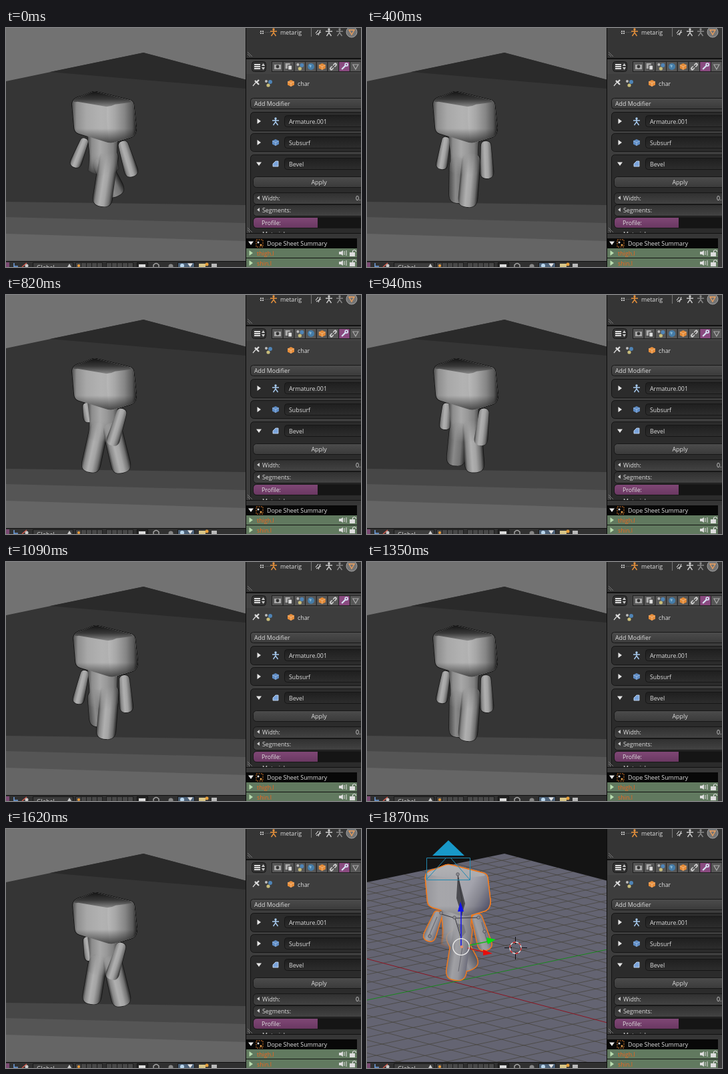
Write an HTML page that moves like this. It is 532 px wide and 359 px high and loops after 2870 ms.

```html
<!DOCTYPE html>
<html lang="en">
<head>
<meta charset="utf-8">
<title>Walk cycle</title>
<style>
html, body { margin: 0; width: 100%; height: 100%; overflow: hidden; background: #333; }
svg { display: block; width: 532px; height: 359px; }
text { font: 8.9px "Open Sans", "Noto Sans", sans-serif; fill: #dedede; }
</style>
</head>
<body>
<svg id="stage" viewBox="0 0 532 359" xmlns="http://www.w3.org/2000/svg"></svg>
<script>
const LOOP = 2870;

// Small SVG helpers
const path = (d, fill, extra = '') => `<path d="${d}" fill="${fill}" ${extra}/>`;
const line = (d, color, width = 1, extra = '') =>
  `<path d="${d}" fill="none" stroke="${color}" stroke-width="${width}" ${extra}/>`;
const rect = (x, y, w, h, fill, extra = '') =>
  `<rect x="${x}" y="${y}" width="${w}" height="${h}" fill="${fill}" ${extra}/>`;
const dot = (x, y, r, fill, extra = '') => `<circle cx="${x}" cy="${y}" r="${r}" fill="${fill}" ${extra}/>`;
const text = (x, y, s, extra = '') => `<text x="${x}" y="${y}" ${extra}>${s}</text>`;
const gradient = (id, dir, colors) =>
  `<linearGradient id="${id}" x1="${dir[0]}" y1="${dir[1]}" x2="${dir[2]}" y2="${dir[3]}">` +
  colors.split(' ').map(s => {
    const [color, at] = s.split('@');
    return `<stop offset="${at}%" stop-color="${color}"/>`;
  }).join('') + '</linearGradient>';

const ACROSS = [0, 0, 1, 0], DOWN = [0, 0, 0, 1];
const FLOOR = 'M0 80L206 37L359 77.500V350H0Z';
const defs = `<defs>
${gradient('lit-limb', ACROSS, '#383838@0 #858585@13 #b0b0b0@38 #a4a4a4@60 #707070@84 #262626@100')}
${gradient('lit-far', ACROSS, '#4a4a4a@0 #8a8a8a@35 #737373@70 #222@100')}
${gradient('lit-body', ACROSS, '#4a4a4a@0 #8c8c8c@14 #a8a8a8@40 #989898@62 #808080@82 #404040@100')}
${gradient('lit-front', ACROSS, '#4c4c4c@0 #8f8f8f@7 #a8a8a8@22 #b2b2b2@45 #a8a8a8@100')}
${gradient('lit-side', ACROSS, '#b8b8b8@0 #a6a6a6@28 #868686@60 #5a5a5a@86 #1e1e1e@100')}
${gradient('lit-top', DOWN, '#161616@0 #383838@50 #858585@100')}
${gradient('lit-shade', DOWN, '#0000@0 #0000@72 #0009@100')}
${gradient('clay-limb', ACROSS, '#77777e@0 #a0a0a4@30 #98989d@60 #6d6d7b@100')}
${gradient('clay-far', ACROSS, '#77777e@0 #93939a@40 #55555f@100')}
${gradient('clay-body', ACROSS, '#85858a@0 #a5a5a9@35 #9b9ba0@65 #77777f@100')}
${gradient('clay-front', ACROSS, '#96969b@0 #a6a6aa@20 #a3a3a8@100')}
${gradient('clay-side', [0, 0, 1, 0.8], '#a9a9b0@0 #a3a3ac@35 #85858f@65 #505068@100')}
${gradient('clay-top', DOWN, '#b2b2b5@0 #a8a8ac@100')}
${gradient('clay-shade', DOWN, '#0000@0 #0000@80 #0003@100')}
${gradient('fade-down', DOWN, '#fff@0 #fff@50 #000@95')}
${gradient('button', DOWN, '#4c4c4c@0 #3a3a3a@100')}
${gradient('field', DOWN, '#303030@0 #434343@100')}
${gradient('entry', DOWN, '#1f1f1f@0 #2d2d2d@100')}
${gradient('slider', DOWN, '#7f4775@0 #6a3862@100')}
<mask id="fade" maskUnits="userSpaceOnUse" x="100" y="150" width="100" height="75">
${rect(100, 150, 100, 75, 'url(#fade-down)')}</mask>
<clipPath id="view"><rect width="359" height="350"/></clipPath>
<clipPath id="floor"><path d="${FLOOR}"/></clipPath>
<clipPath id="panel"><rect x="360" y="0" width="172" height="308"/></clipPath>
</defs>`;

// Poses: head shift, then start and tip of far arm, near arm, far leg, near leg
const contact = [0, 119, 166, 102, 209, 174, 170, 190, 223, 139, 195, 168, 252, 156, 182, 143, 268];
const passing = [0, 119, 164, 111, 212, 178, 170, 180, 226, 137, 195, 137, 263, 157, 188, 150, 269];
const reach = [1, 121, 162, 127, 198, 174, 171, 157, 226, 139, 190, 127, 263, 157, 190, 175, 266];
const stride = [0, 120, 162, 126, 191, 175, 171, 158, 226, 141, 192, 125, 266, 157, 192, 175, 267];
const back = [2, 119, 163, 107, 213, 177, 170, 181, 226, 135, 192, 140, 247, 156, 184, 149, 266];
const mix = (a, b) => a.map((v, i) => (v + b[i]) / 2);
const closing = mix(passing, reach), opening = mix(stride, back);

// A tapered limb with rounded ends, built upright and then turned
function limb([x1, y1, x2, y2], top, tip, fill) {
  const len = Math.hypot(x2 - x1, y2 - y1);
  const turn = Math.atan2(y2 - y1, x2 - x1) * 180 / Math.PI - 90;
  const a = top / 2, b = tip / 2, end = len - b;
  const d = `M${-a} ${a}Q${-a} 0 0 0Q${a} 0 ${a} ${a}L${b} ${end}` +
    `C${b} ${len - 3} ${b * 0.65} ${len} 0 ${len}C${-b * 0.65} ${len} ${-b} ${len - 3} ${-b} ${end}Z`;
  return path(d, fill, `transform="translate(${x1} ${y1}) rotate(${turn})"`);
}

function head(dx, skin) {
  const id = part => `url(#${skin}-${part})`;
  const shape = 'M101 109Q103 104 113 102L128 96Q133 94 140 96L184 107Q191 108 192 114L196 149Q196 160 189 163L163 171Q156 173 149 170L110 158Q104 156 103 150L100 117Q99 112 101 109Z';
  return `<g transform="translate(${dx - 0.7} .8)">` +
    path(shape, id('front')) +
    path('M152 118Q157 113 166 113L184 107Q191 108 192 114L196 149Q196 160 189 163L163 171Q157 173 155 167Q151 140 152 118Z', id('side')) +
    path('M101 109Q103 104 113 102L128 96Q133 94 140 96L184 107Q190 109 188 111L164 114Q157 118 149 117L108 110Q102 111 101 109Z', id('top')) +
    path(shape, id('shade')) + '</g>';
}

function figure(p, skin) {
  const id = part => `url(#${skin}-${part})`;
  return limb(p.slice(1, 5), 12, 17, id('limb')) +
    limb(p.slice(9, 13), 27, 28, id(p[11] > 132 ? 'far' : 'limb')) +
    limb(p.slice(13, 17), 28, 29, id('limb')) +
    path('M122 160L125 186Q126 198 123 214Q134 222 148 221Q161 222 169 211Q164 193 168 162Z', id('body'), 'mask="url(#fade)"') +
    limb(p.slice(5, 9), 15, 20, id('limb')) +
    head(p[0], skin);
}

const rim = (inner, color, width) => `<g stroke="${color}" stroke-width="${width}">${inner}</g>`;
const rendered = pose => {
  const body = figure(pose, 'lit');
  return rim(body, '#151515', 1.4) + body;
};

const room = rect(0, 0, 359, 350, '#727272') +
  path(FLOOR, '#353535') +
  path('M66 66L206 37L359 77.500V91Z', '#2a2a2a') +
  path('M0 261L359 266V350H0Z', '#474747') +
  path('M0 284L359 293V350H0Z', '#555') +
  path('M0 309L359 320V350H0Z', '#656565');

// Ground lines run between the far edge and the axis, widening toward the viewer
function grid() {
  const cells = 16;
  let d = '';
  for (let k = 1; k < cells * 2; k++) {
    const t = k / cells, s = t / (t + 1.2 * (1 - t));
    const at = (far, axis) => far + (axis - far) * s;
    if (k !== cells) d += `M0 ${at(-17, 195)}L360 ${at(77.5, 291)}M0 ${at(80, 257)}L360 ${at(5, 181)}`;
  }
  return line(d, '#48463f', 0.8);
}

function editor() {
  const clay = figure(contact, 'clay');
  const ground = rect(0, 0, 359, 350, '#141414') +
    path(FLOOR, '#646472') +
    `<g clip-path="url(#floor)">${grid()}` +
    line('M0 195L360 291', '#8b1420') + line('M0 257L360 181', '#18881c') + '</g>';
  const camera = path('M122 17L146 40H98Z', '#1898c8') +
    line('M89.5 43.5H154.5V76.5H89.5ZM89 76L119 43M154 76L125 43', '#2189b0');
  const bones = path('M136 68L147 112L142 130L134 104Z', '#4b4b50') +
    line('M136 68L143 112L142 130M112 128L132 134L167 133M132 134L141 164', '#33333a') +
    path('M135 142L142 163L148 155L145 144Z', '#77777d') +
    line('M105 132L93 160M172 140L181 172M143 177L137 214', '#62626b') +
    [[136, 68], [111, 126], [131, 133], [167, 133], [176, 154], [94, 161]]
      .map(([x, y]) => dot(x, y, 2.3, '#8f8f95', 'stroke="#44444a" stroke-width=".7"')).join('');
  const gizmo = line('M141 176V122', '#1717e8', 1.6) + path('M140 109L145 124H136Z', '#1010f0') +
    line('M152 175L181 169', '#18b81c', 1.5) + path('M193 166L179 163L181 173Z', '#08dc10') +
    line('M151 179L176 185', '#c81818', 1.5) + path('M188 187L174 181L174 190Z', '#e80c0c') +
    dot(141, 177, 12.3, 'none', 'stroke="#eee" stroke-width="1.3"') +
    dot(142, 177, 2.2, '#e09070');
  const cursor = line('M206 178.500H217M229 178.500H240M222.500 162V173M222.500 185V196', '#0c0c0c') +
    dot(222.5, 178.5, 8.5, 'none', 'stroke="#eee" stroke-width="1.3"') +
    dot(222.5, 178.5, 8.5, 'none', 'stroke="#d01414" stroke-width="1.3" stroke-dasharray="4.45"');
  return ground + `<g transform="translate(-11 -41.5)">${rim(clay, '#f27a1c', 3)}${clay}</g>` +
    bones + camera + gizmo + cursor;
}

// Interface parts
const right = (x, y, c = '#e6e6e6') => path(`M${x - 2.5} ${y - 4}L${x + 3} ${y}L${x - 2.5} ${y + 4}Z`, c);
const down = (x, y, c = '#e6e6e6') => path(`M${x - 4} ${y - 2.5}H${x + 4}L${x} ${y + 3}Z`, c);
const left = (x, y) => path(`M${x + 2} ${y - 3}L${x - 2} ${y}L${x + 2} ${y + 3}Z`, '#ccc');
const person = (x, y, c) => dot(x, y - 4, 1.7, c) +
  line(`M${x - 5} ${y - 1}H${x + 5}M${x} ${y - 3}V${y + 1}L${x - 3.5} ${y + 6}M${x} ${y + 1}L${x + 3.5} ${y + 6}`, c, 1.4);
const cube = (x, y, c, s = 5) =>
  path(`M${x} ${y - s}L${x + s} ${y - s / 2}V${y + s / 2}L${x} ${y + s}L${x - s} ${y + s / 2}V${y - s / 2}Z`, c) +
  line(`M${x - s} ${y - s / 2}L${x} ${y}L${x + s} ${y - s / 2}M${x} ${y}V${y + s}`, '#fff', 0.7, 'opacity=".55"');
const button = (y, h, fill) => rect(370.5, y + 0.5, 170, h, fill, 'rx="5" stroke="#171717"');
const nodes = (x, y) => dot(x - 3, y - 3, 2, '#bbb') + dot(x + 3, y - 2, 3, '#4e83b5') + dot(x, y + 3, 2.6, '#c8bd7b');
const grip = (x, y) => line(`M${x} ${y}l7 7M${x} ${y + 3}l4 4`, '#8a8a8a', 0.8);

function modifier(y, h, name, open, icon) {
  return rect(366.5, y + 0.5, 180, h, '#2b2b2b', 'rx="5" stroke="#151515"') +
    rect(417.5, y + 5.5, 125, 17, 'url(#entry)', 'rx="4" stroke="#161616"') +
    (open ? down : right)(379, y + 14) + icon + text(424, y + 18, name);
}

function outliner() {
  return rect(360, 0, 172, 46, '#353535') +
    line('M380 6.5H396', '#777', 1, 'stroke-dasharray="1 2"') +
    rect(381, 4, 5, 5, '#bbb') + line('M381 6.5H386M383.5 4V9', '#333') +
    person(401, 6, '#e8923c') + text(411, 10, 'metarig') +
    line('M457.5 0V13', '#777') + line('M464 8L468 3M465 10L472 6M468 11L471 3', '#ccc', 1.2) +
    person(484, 6, '#ccc') + person(500, 6, '#888') +
    dot(518, 6, 8, '#747474', 'stroke="#a4a4a4"') + line('M514 3H522L518 10Z', '#efa15d', 1.3) +
    grip(362, 36) + rect(360, 45, 172, 2, '#111');
}

function tabs() {
  const tab = (i, icon, fill = '#575757') =>
    rect(398.5 + i * 16.7, 50.5, 16.7, 15, fill, 'stroke="#202020"') + icon(407 + i * 16.7, 58);
  const icons = [
    (x, y) => rect(x - 5, y - 3, 10, 7, '#aaa') + dot(x, y, 2.4, '#333'),
    (x, y) => rect(x - 5, y - 5, 7, 8, '#aaa') + rect(x - 1, y - 2, 6, 7, '#ddd', 'stroke="#333"'),
    nodes,
    (x, y) => dot(x, y, 5, '#457ca8') + path(`M${x - 3} ${y - 3}l4 1l-2 4Z`, '#86b6d2'),
    (x, y) => cube(x, y, '#e48a35'),
    (x, y) => line(`M${x - 3} ${y + 3}l1 -1M${x + 2} ${y - 2}l1 -1`, '#ccc', 5, 'stroke-linecap="round"') +
      line(`M${x - 3} ${y + 3}L${x + 3} ${y - 3}`, '#444', 1.5),
    (x, y) => line(`M${x - 4} ${y + 4}L${x + 2} ${y - 2}`, '#d8e4f4', 2.2) + dot(x + 3, y - 3, 2, 'none', 'stroke="#d8e4f4" stroke-width="1.7"'),
    (x, y) => line(`M${x - 4} ${y - 3}H${x + 4}L${x} ${y + 4}Z`, '#aaa', 1.2)
  ];
  return rect(360, 47, 172, 22, '#424242') +
    rect(368.5, 50.5, 21, 15, '#343434', 'rx="4" stroke="#161616"') +
    rect(372, 54, 9, 2, '#ddd') + rect(372, 57, 9, 2, '#ddd') + rect(372, 60, 9, 2, '#ddd') +
    path('M383 57L385.500 53L388 57ZM383 59L385.500 63L388 59Z', '#ccc') +
    icons.map((f, i) => tab(i, f, i === 6 ? '#8a4a80' : undefined)).join('');
}

function properties() {
  return `<g clip-path="url(#panel)">` + rect(360, 69, 172, 240, '#3d3d3d') +
    line('M370 87L375 81', '#ddd', 1.2) + line('M373 79L379 85M375 82L379 78', '#ddd', 2.4) +
    nodes(393, 83) + cube(427, 83, '#e88e3a') + text(437, 87, 'char') +
    rect(366.5, 105.5, 180, 16, 'url(#button)', 'rx="4" stroke="#171717"') + text(372, 117, 'Add Modifier') +
    modifier(126, 28, 'Armature.001', false, person(404, 140, '#a8cbf0')) +
    modifier(158, 27, 'Subsurf', false, cube(404, 172, '#5d8bc4')) +
    modifier(190, 130, 'Bevel', true, path('M400 208V204L404 200H408V208Z', '#7aa4db', 'stroke="#d6e4f6" stroke-width=".8"')) +
    button(223, 16, 'url(#button)') + text(469, 235, 'Apply', 'text-anchor="middle"') +
    button(247, 17, 'url(#field)') + left(378, 255) + text(384, 259, 'Width:') + text(524, 259, '0.') +
    button(265, 17, 'url(#field)') + left(378, 273) + text(384, 277, 'Segments:') +
    button(284, 16, '#151515') + path('M376 285H467V300H376Q371 300 371 295V290Q371 285 376 285Z', 'url(#slider)') +
    text(383, 296, 'Profile:') + text(384, 313, 'Material:') + grip(362, 300) + '</g>';
}

function dopeSheet() {
  const row = (y, name) => rect(360, y, 166, 14, '#61795f') + right(367, y + 7, '#b8dcae') +
    text(376, y + 11, name, 'style="fill:#ef641d"') +
    path(`M499 ${y + 5}h3l3 -2v8l-3 -2h-3Z`, '#ddd') + line(`M507 ${y + 4}v6M510 ${y + 3}v8`, '#ddd') +
    rect(515, y + 6, 8, 6, '#ddd') + line(`M519.500 ${y + 6}v-2q2.500 -3 5 0v1`, '#ddd', 1.2);
  return rect(360, 308, 172, 51, '#111') + rect(360, 309, 172, 7, '#363636') +
    rect(360, 316, 166, 15, '#080808') + rect(526, 316, 6, 43, '#3a3a3a') + down(367, 323) +
    rect(375, 318, 10, 11, 'none', 'stroke="#d8782a" stroke-dasharray="2 1.5"') +
    dot(378, 322, 1.5, '#ddd') + dot(382, 326, 1.5, '#eea34c') +
    text(391, 327, 'Dope Sheet Summary') + row(331, 'thigh.l') + row(346, 'shin.l');
}

function footer() {
  const cell = i => rect(104.5 + i % 5 * 8 + (i > 4 ? 46 : 0), 352.5, 8, 9, '#484848', 'stroke="#1b1b1b"');
  return rect(0, 350, 360, 9, '#303030') + rect(0, 350, 360, 1, '#111') +
    path('M0 352H5V359H0Z', '#7b4a73') + line('M12 359V353M12 358H18', '#6fa0df', 1.5) +
    line('M24 359L31 353', '#d45a4c', 1.5) + dot(31, 357, 2.5, '#ccc') +
    rect(40.5, 352.5, 60, 12, '#3c3c3c', 'stroke="#171717"') + text(46, 363, 'Global') +
    path('M92 359L95 354L98 359Z', '#ccc') +
    Array.from({ length: 10 }, (_, i) => cell(i)).join('') + dot(109, 357, 2, '#ee9b37') +
    rect(196.5, 352.5, 16, 10, '#282828', 'stroke="#111"') + rect(199, 355, 10, 5, '#ddd') +
    line('M221 359V356Q225 351 229 356V359', '#aaa', 1.4) + dot(247, 358, 3.5, '#888') +
    rect(257.5, 352.5, 25, 10, '#4c6178', 'stroke="#171717"') + dot(264, 357, 3, '#bad7ee') + down(276, 356) +
    rect(289, 354, 10, 5, '#d8c689') + dot(301, 355, 2.5, '#e8a13c') + rect(308, 354, 8, 5, '#bbb');
}

// When each picture starts
const steps = [
  [0, contact], [400, passing], [540, closing], [660, reach], [820, stride], [940, opening],
  [1090, back], [1210, contact], [1350, passing], [1480, closing], [1620, reach], [1870, null]
];

const scenes = steps.map(([, pose]) => `<g class="scene" display="none">${pose ? room + rendered(pose) : editor()}</g>`);
const stage = document.getElementById('stage');
stage.innerHTML = defs + `<g clip-path="url(#view)">${scenes.join('')}</g>` +
  outliner() + tabs() + properties() + dopeSheet() + footer() + rect(359, 0, 1, 359, '#0c0c0c');

const views = [...stage.querySelectorAll('.scene')];
let shown = -1;
function tick() {
  const t = performance.now() % LOOP;
  const now = steps.filter(([start]) => start <= t).length - 1;
  if (now !== shown) {
    views.forEach((v, i) => v.setAttribute('display', i === now ? 'inline' : 'none'));
    shown = now;
  }
  requestAnimationFrame(tick);
}
tick();
</script>
</body>
</html>
```
